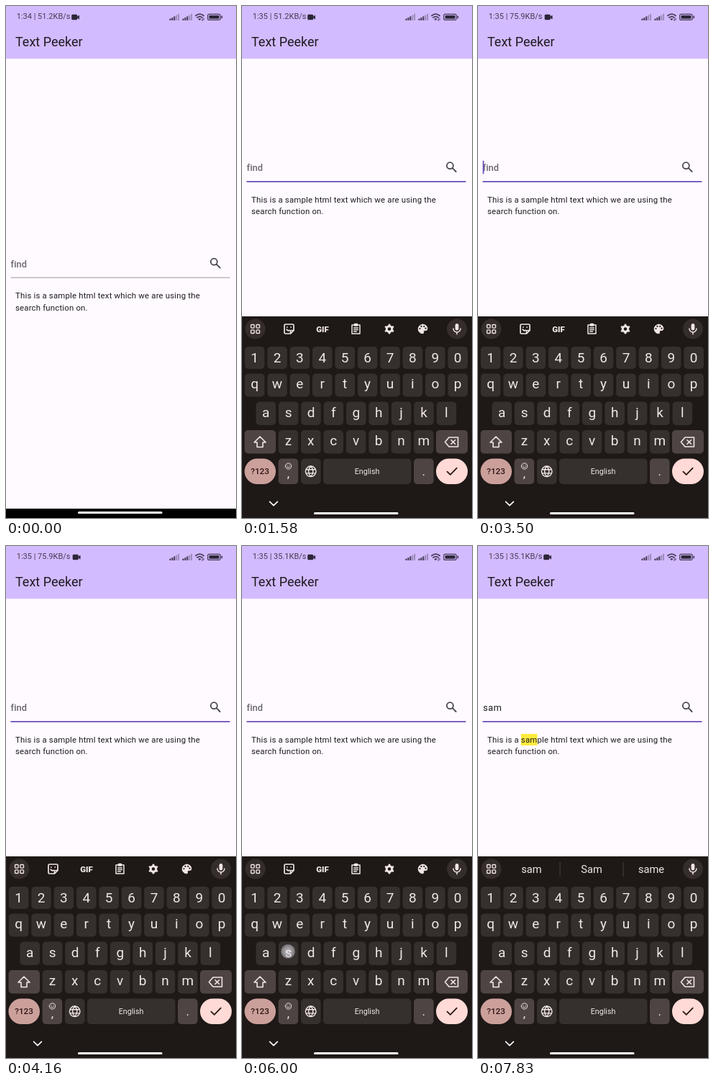
An HTML page with a canvas for the animation above (8000 ms loop, 320 by 711 pixels).

```html
<!DOCTYPE html>
<html lang="en">
<head>
<meta charset="utf-8">
<title>Text search demo</title>
<style>
  html, body { margin: 0; width: 100%; height: 100%; overflow: hidden; background: #fffaff; }
  canvas { display: block; width: 320px; height: 711px; }
</style>
</head>
<body>
<canvas id="stage"></canvas>
<script>
const W = 320, H = 711, LOOP = 8000, NAV_TOP = 698, KEYS_TOP = 431;
const INK = '#1d1b20', PURPLE = '#6b4bb8', PAPER = '#fffaff';
const KB = '#1e1817', KEY = '#352f2e', KEY_ALT = '#4e4443', LIGHT = '#f1e7e5';
const LINES = ['This is a sample html text which we are using the', 'search function on.'];

// Each edit: time, field text, word suggestions, tapped point
const EDITS = [
  [680, ''],
  [2050, 'i', ['I', 'is', 'in'], [237, 524]],
  [2420, 'is', ['is', 'us', "it's"], [64, 563]],
  [3250, 'i', ['I', 'is', 'in'], [292, 605]],
  [3430, '', null, [292, 605]],
  [6090, 's', ['s', 'so', 'she'], [64, 563]],
  [6560, 'sa', ['sa', 'say', 'same'], [33, 563]],
  [7050, 'sam', ['sam', 'Sam', 'same'], [253, 603]]
];

const canvas = document.getElementById('stage');
const ctx = canvas.getContext('2d');
const dpr = window.devicePixelRatio || 1;
canvas.width = W * dpr;
canvas.height = H * dpr;

function setFont(size, weight = 400, spacing = 0) {
  ctx.font = `${weight} ${size}px Roboto, sans-serif`;
  ctx.letterSpacing = spacing + 'px';
}
function text(str, x, y, size, color, { weight, spacing, align = 'left' } = {}) {
  setFont(size, weight, spacing);
  ctx.textAlign = align;
  ctx.fillStyle = color;
  ctx.fillText(str, x, y);
}
const centered = (str, x, y, size, color = LIGHT, weight = 400) =>
  text(str, x, y, size, color, { weight, align: 'center' });

function box(x, y, w, h, color, radius = 0) {
  ctx.fillStyle = color;
  ctx.beginPath();
  ctx.roundRect(x, y, w, h, radius);
  ctx.fill();
}
function disc(x, y, r, color) {
  ctx.fillStyle = color;
  ctx.beginPath();
  ctx.arc(x, y, r, 0, 7);
  ctx.fill();
}
// Strokes an SVG path around the point (x, y)
function icon(path, x, y, color = LIGHT, width = 1.5, fill) {
  ctx.save();
  ctx.translate(x, y);
  ctx.lineWidth = width;
  ctx.strokeStyle = color;
  ctx.lineJoin = ctx.lineCap = 'round';
  const shape = new Path2D(path);
  if (fill) { ctx.fillStyle = color; ctx.fill(shape); }
  ctx.stroke(shape);
  ctx.restore();
}
const ring = (cx, cy, r) => `M${cx - r} ${cy}a${r} ${r} 0 1 0 ${2 * r} 0a${r} ${r} 0 1 0 ${-2 * r} 0`;

function drawStatus(t) {
  box(0, 0, W, 73.3, '#d3bbff');
  const clock = t < 1250 ? '1:34' : '1:35';
  const rate = t < 2100 ? '51.2' : t < 5200 ? '75.9' : '35.1';
  const dark = '#443b57';
  text(`${clock} | ${rate}KB/s`, 14.7, 17.6, 11, dark);

  const cam = rate === '75.9' ? 92.7 : 91.2;
  box(cam, 11.8, 8, 7.4, '#2c2638', 1.5);
  icon('M0 0L3 -2.2V2.2Z', cam + 7.4, 15.5, '#2c2638', .8, true);

  for (const x of [227.5, 245.5])
    for (let i = 0; i < 5; i++)
      box(x + i * 2.9, 17.6 - i * 1.7, 2, 2.4 + i * 1.7, i < 3 ? dark : '#9b8bb9', .6);

  icon('M-5.6 -2Q0 -6.6 5.6 -2M-3.6 .6Q0 -2.4 3.6 .6', 269.5, 15.5, dark, 1.7);
  icon('M-1.4 2.4Q0 1.4 1.4 2.4L0 4Z', 269.5, 15.5, dark, 1, true);
  icon('M3.5 2.5V5M5.5 1.5V4', 269.5, 15.5, dark, 1);

  icon('M-7 -4H6.5Q8.5 -4 8.5 -2V2Q8.5 4 6.5 4H-7Q-9 4 -9 2V-2Q-9 -4 -7 -4Z', 289.7, 15.4, dark, 1.2);
  box(282.5, 13, 14, 4.8, '#2c2638', 1);
  box(299.5, 13.5, 1.6, 4, dark, .8);

  text('Text Peeker', 13, 56, 18, INK);
}

function drawField(t, top, edit) {
  const y = 357 - Math.max(0, NAV_TOP - top) / 2;
  const query = edit ? edit[1] : '';
  if (query) text(query, 7, y + 5.7, 13, INK, { spacing: .4 });
  else text('find', 6.5, y + 5.7, 12.8, '#69646d', { spacing: .1, weight: 500 });
  if (edit && (t - edit[0]) % 1000 < 500) {
    setFont(13, 400, .4);
    box(6.6 + ctx.measureText(query).width, y - 8.8, 1.7, 18.5, PURPLE);
  }
  icon(ring(-2, -2, 4.5) + 'M1.5 1.5L6.3 6.3', 291.4, y + .2, '#49454f', 1.8);
  if (edit) box(6.5, y + 19.5, 305, 1.7, PURPLE);
  else box(6.5, y + 19.7, 305, .9, '#7c7680');

  LINES.forEach((line, row) => {
    const base = y + 49.4 + row * 16.3;
    setFont(11.4, 400, .18);
    const width = s => ctx.measureText(s).width;
    for (let i = query ? line.indexOf(query) : -1; i >= 0; i = line.indexOf(query, i + query.length))
      box(13 + width(line.slice(0, i)), base - 12, width(query), 16, '#ffeb3b');
    text(line, 13, base, 11.4, INK, { spacing: .18 });
  });
}

function drawToolbar(words) {
  const y = 448.5;
  disc(18.5, y, 14, '#352d2c');
  disc(299, y, 14, '#352d2c');
  for (const [dx, dy] of [[-6, -6], [1.4, -6], [-6, 1.4], [1.4, 1.4]])
    icon('M1 0H3.6Q4.6 0 4.6 1V3.6Q4.6 4.6 3.6 4.6H1Q0 4.6 0 3.6V1Q0 0 1 0Z', 18.5 + dx, y + dy, LIGHT, 1.4);

  box(296.6, y - 7.5, 4.8, 9.5, LIGHT, 2.4);
  icon('M-5 -.5A5 5 0 0 0 5 -.5M0 4.5V7.2', 299, y, LIGHT, 1.5);

  if (words) {
    words.forEach((word, i) => centered(word, [74.5, 158, 241][i], 453.8, 14.7));
    box(113.6, 439, 1, 20, '#4a4140');
    box(201.6, 439, 1, 20, '#4a4140');
    return;
  }
  icon('M-5 -6.5H5Q6.5 -6.5 6.5 -5V2L2 6.5H-5Q-6.5 6.5 -6.5 5V-5Q-6.5 -6.5 -5 -6.5ZM6.5 2H3.5Q2 2 2 3.5V6.5M-3.4 .6Q-1.5 3.4 1 1.8M-2.6 -2.6V-2.4M2.6 -2.6V-2.4', 65.5, y, LIGHT, 1.7);
  centered('GIF', 112, y + 4, 11.5, LIGHT, 900);
  icon('M-5.5 -5.5H5.5V6.5H-5.5ZM-2.8 -1.5H2.8M-2.8 1H2.8M-2.8 3.5H1', 158.5, y, LIGHT, 1.5);
  box(155.7, y - 7.8, 5.6, 4, LIGHT, 1.2);
  icon(ring(0, 0, 3.8), 205, y, LIGHT, 3);
  for (let a = 0; a < 6; a++) {
    const angle = a * Math.PI / 3 + Math.PI / 6, c = Math.cos(angle), s = Math.sin(angle);
    icon(`M${c * 4.8} ${s * 4.8}L${c * 5.7} ${s * 5.7}`, 205, y, LIGHT, 2.8);
  }
  icon('M0 -6.3A6.3 6.3 0 0 0 0 6.3Q1.8 6 1 4Q.6 2 3 2H4Q6.4 2 6.4 -.6Q6 -6 0 -6.3Z', 251.5, y, LIGHT, 1, true);
  for (const [dx, dy] of [[-4, -.5], [-2, -3.6], [1.8, -3.6], [4, -.8]]) disc(251.5 + dx, y + dy, 1.1, KB);
}

function drawKeys() {
  // Each row: characters, first key centre, top, height, text baseline
  const rows = [
    ['1234567890', 17.6, 473, 31, 495],
    ['qwertyuiop', 17.6, 510.5, 32, 531],
    ['asdfghjkl', 33.2, 549.5, 32.5, 570.5],
    ['zxcvbnm', 64.4, 589, 32.5, 610]
  ];
  for (const [chars, x0, top, height, base] of rows)
    [...chars].forEach((char, i) => {
      const x = x0 + i * 31.4;
      box(x - 13.8, top, 27.6, height, KEY, 5);
      centered(char, x, base, 19);
    });

  box(3.5, 589, 43.5, 32.5, KEY_ALT, 5);
  icon('M0 -7.5L8 .5H4V7H-4V.5H-8Z', 25, 605.5, LIGHT, 1.6);
  box(270, 589, 44, 32.5, KEY_ALT, 5);
  icon('M-4 -6.5H8.5V6.5H-4L-9.5 0ZM-1 -2.8L4.6 2.8M4.6 -2.8L-1 2.8', 292, 605.5, LIGHT, 1.6);

  const top = 628.5, h = 35.5;
  box(3.5, top, 43.5, h, '#cba09b', 17.7);
  centered('?123', 25, 650.2, 11.7, '#2c1513', 500);
  box(50.6, top, 27.6, h, KEY_ALT, 5);
  icon(ring(0, 0, 4.1) + 'M-2 1Q0 3.2 2 1M-1.5 -1.3V-1.2M1.5 -1.3V-1.2', 64.4, 639, LIGHT, 1);
  centered(',', 64.4, 655, 17);
  box(82, top, 27.6, h, KEY, 5);
  icon(ring(0, 0, 7.3) + 'M0 -7.3Q-6.4 0 0 7.3Q6.4 0 0 -7.3M-6.7 -2.6H6.7M-6.7 2.6H6.7', 95.7, 646.3, LIGHT, 1.4);
  box(113, top, 122.5, h, KEY, 5);
  centered('English', 174, 650, 10.7);
  box(239, top, 27.6, h, KEY_ALT, 5);
  centered('.', 252.8, 652, 17);
  box(270, top, 44, h, '#ffdad6', 17.7);
  icon('M-6.5 .3L-2.2 4.6L6.8 -4.6', 292, 646.3, '#2c1513', 1.8);
}

function drawTap(t) {
  const hit = EDITS.find(e => e[3] && t >= e[0] - 110 && t < e[0]);
  if (!hit) return;
  const [x, y] = hit[3];
  const glow = ctx.createRadialGradient(x, y, 0, x, y, 10.5);
  glow.addColorStop(0, 'rgba(255,255,255,.65)');
  glow.addColorStop(.45, 'rgba(235,235,240,.6)');
  glow.addColorStop(.85, 'rgba(200,200,210,.5)');
  glow.addColorStop(1, 'rgba(200,200,210,0)');
  disc(x, y, 10.5, glow);
}

function draw(t) {
  const edit = EDITS.filter(e => e[0] <= t).pop();
  const slide = Math.min(1, Math.max(0, (t - 700) / 420));
  const top = H - (H - KEYS_TOP) * (1 - (1 - slide) ** 3);

  ctx.setTransform(dpr, 0, 0, dpr, 0, 0);
  box(0, 0, W, H, PAPER);
  drawStatus(t);
  drawField(t, top, edit);
  box(0, NAV_TOP, W, H - NAV_TOP, '#000');
  if (slide > 0) {
    box(0, top, W, H - top, KB);
    ctx.save();
    ctx.translate(0, top - KEYS_TOP);
    drawToolbar(edit && edit[2]);
    drawKeys();
    ctx.restore();
    icon('M-5.4 -2.6L0 2.6L5.4 -2.6', 44, 691, '#fff', 1.7);
  }
  box(100, 702 + slide, 117.5, 3, '#fff', 1.5);
  drawTap(t);
}

function tick() {
  draw(performance.now() % LOOP);
  requestAnimationFrame(tick);
}
tick();
</script>
</body>
</html>
```
